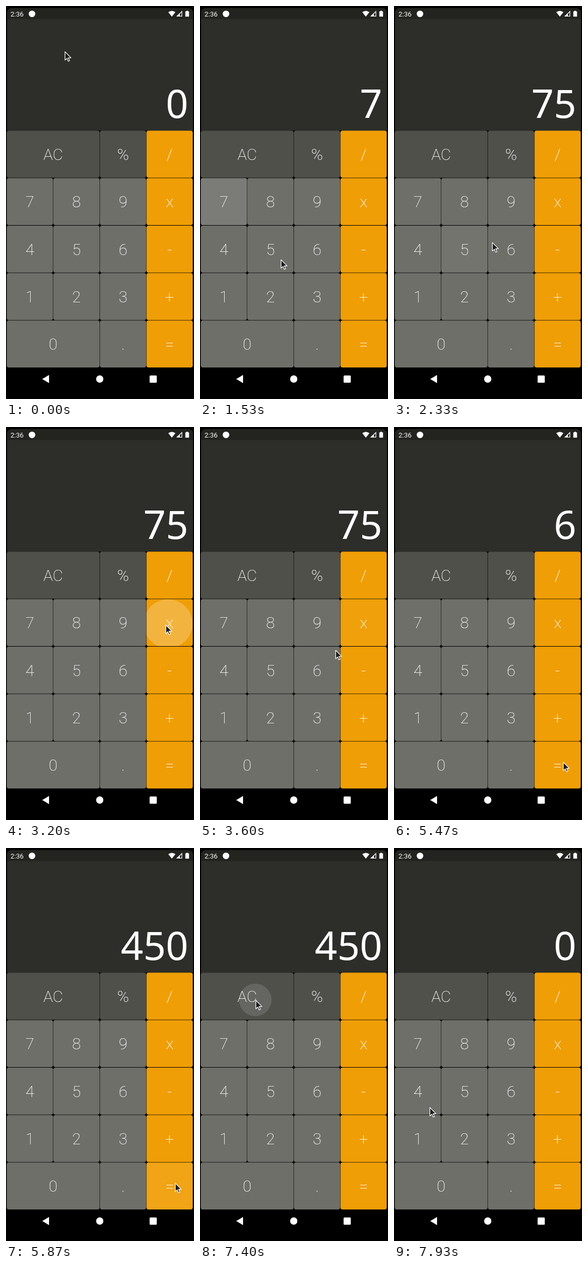
An HTML page that plays this animation: 358x748 px, repeating every 8000 ms.

```html
<!DOCTYPE html>
<html lang="en">
<head>
<meta charset="utf-8">
<title>Calculator</title>
<style>
  html, body { margin: 0; width: 100%; height: 100%; overflow: hidden; background: #000; }
  svg { display: block; width: 358px; height: 748px; }
  text { fill: #fff; font-family: Roboto, sans-serif; }
  .op { fill: #4f504a; }
  .num { fill: #6e6f69; }
  .act { fill: #ef9e06; }
  .label { font-size: 30px; font-weight: 100; text-anchor: middle; stroke: #fff; stroke-width: .15px; }
  #display { font: 400 75px "Noto Sans", "Open Sans", sans-serif; text-anchor: end; }
  #clock { font-size: 13px; }
</style>
</head>
<body>
<svg viewBox="0 0 358 748">
  <rect width="358" height="748"/>
  <path d="M2 237V14Q2 4 12 4H346Q356 4 356 14V237Z" fill="#2d2e29"/>
  <path d="M2 25V14Q2 4 12 4H346Q356 4 356 14V25Z" fill="#232420"/>

  <text id="clock" x="8.5" y="19.5">2:36</text>
  <g fill="#fff">
    <circle cx="49.5" cy="15" r="6.2"/>
    <path d="M309 11.8Q315.8 6.8 322.6 11.8L315.8 20.2Z"/>
    <path d="M335.5 9V20H324Z M334.3 12L331 15.2V18.8H334.3Z" fill-rule="evenodd"/>
    <path d="M343.5 9H346.5V10.2H348.5V20.2H341.5V10.2H343.5Z"/>
    <path d="M69 710L82 702.3V717.7Z"/>
    <circle cx="178.5" cy="710" r="6.9"/>
    <rect x="273.5" y="703.3" width="13.6" height="13.6" rx="1.5"/>
  </g>

  <text id="display" x="347.2" y="213"></text>
  <g id="keys"></g>
  <g id="ripples" fill="#fff"></g>
  <g id="labels"></g>
  <g id="cursor">
    <path d="M-.6 0V16L3.1 12.6L5.6 18.3L8.1 17.2L5.6 11.6H10.8Z"
          fill="#1c1c1c" stroke="#fff" stroke-width="1.2" stroke-linejoin="round"/>
  </g>
</svg>
<script>
const LOOP = 8000, FRAME = 1000 / 15;
const HOLD = 200, GROW = 180, FADE = 120, GLOW = 0.25;
const COL = 88.7, ROW = 90.3;
const $ = id => document.getElementById(id);

// In rows of three, the first key is two columns wide.
const keys = ['AC % /', '7 8 9 x', '4 5 6 -', '1 2 3 +', '0 . ='].flatMap((line, row) => {
  const labels = line.split(' '), extra = 4 - labels.length;
  return labels.map((label, i) => {
    const col = i && i + extra, span = i ? 1 : 1 + extra;
    const x = 1.4 + col * COL, y = 237.3 + row * ROW, w = span * COL - 0.6, h = ROW - 0.8;
    const cls = col === 3 ? 'act' : row ? 'num' : 'op';
    return { label, cls, x, y, w, h, cx: x + w / 2, cy: y + h / 2 };
  });
});

// Pointer trips: departure, arrival, destination, then the key pressed there and when.
const trips = [
  [400, 800, 75, 348],
  [870, 930, 54, 382, '7', 1210],
  [930, 1330, 155, 483],
  [1670, 1730, 147, 476, '5', 1900],
  [2200, 2600, 305, 377, 'x', 3080],
  [3470, 3730, 213, 473, '6', 4300],
  [4700, 5200, 323, 638, '=', 5500],
  [6200, 7130, 107, 290, 'AC', 7333],
  [7600, 7930, 69, 494]
];
const presses = trips.filter(trip => trip[4]).map(([, , x, y, label, start]) =>
  ({ x, y, label, start, release: start + HOLD, key: keys.find(k => k.label === label) }));

const box = k => `<rect x="${k.x}" y="${k.y}" width="${k.w}" height="${k.h}" rx="4" class="${k.cls}"/>`;
$('keys').innerHTML = keys.map(box).join('');
$('labels').innerHTML = keys.map(k =>
  `<text class="label" x="${k.cx}" y="${k.cy + 11}">${k.label}</text>`).join('');
$('ripples').innerHTML = presses.map((p, i) =>
  `<clipPath id="clip${i}">${box(p.key)}</clipPath>
   <g clip-path="url(#clip${i})"><circle id="ripple${i}"/></g>`).join('');

const clamp = v => Math.min(1, Math.max(0, v));
const mix = (a, b, p) => a + (b - a) * p;
const smooth = v => { const p = clamp(v); return p * p * (3 - 2 * p); };

function pointerAt(t) {
  let x = 113, y = 87;
  for (const [depart, arrive, toX, toY] of trips) {
    const p = smooth((t - depart) / (arrive - depart));
    x = mix(x, toX, p);
    y = mix(y, toY, p);
  }
  return [x, y];
}

function readingAt(t) {
  let shown = '0', factor = 1, fresh = true;
  for (const { label, release } of presses) {
    if (t < release) break;
    if (label === 'x') { factor = +shown; fresh = true; }
    else if (label === '=') shown = String(factor * shown);
    else if (label === 'AC') shown = '0';
    else { shown = fresh ? label : shown + label; fresh = false; }
  }
  return shown;
}

function drawRipple({ key, start, release, x, y }, i, t) {
  const p = smooth((t - start) / GROW);
  const shine = clamp((t - start) / 133) * Math.exp(-Math.max(0, t - release) / FADE);
  const c = $('ripple' + i);
  c.setAttribute('cx', mix(x, key.cx, p * p));
  c.setAttribute('cy', mix(y, key.cy, p * p));
  c.setAttribute('r', p * Math.hypot(key.w, key.h) / 2);
  c.setAttribute('opacity', GLOW * shine);
}

function render(now) {
  // The screen advances at 15 frames a second.
  const t = Math.floor((now % LOOP + 5) / FRAME) * FRAME % LOOP;
  $('display').textContent = readingAt(t);
  presses.forEach((p, i) => drawRipple(p, i, t));
  $('cursor').setAttribute('transform', `translate(${pointerAt(t)})`);
}

const begin = performance.now();
function tick() {
  render(performance.now() - begin);
  requestAnimationFrame(tick);
}
tick();
</script>
</body>
</html>
```
